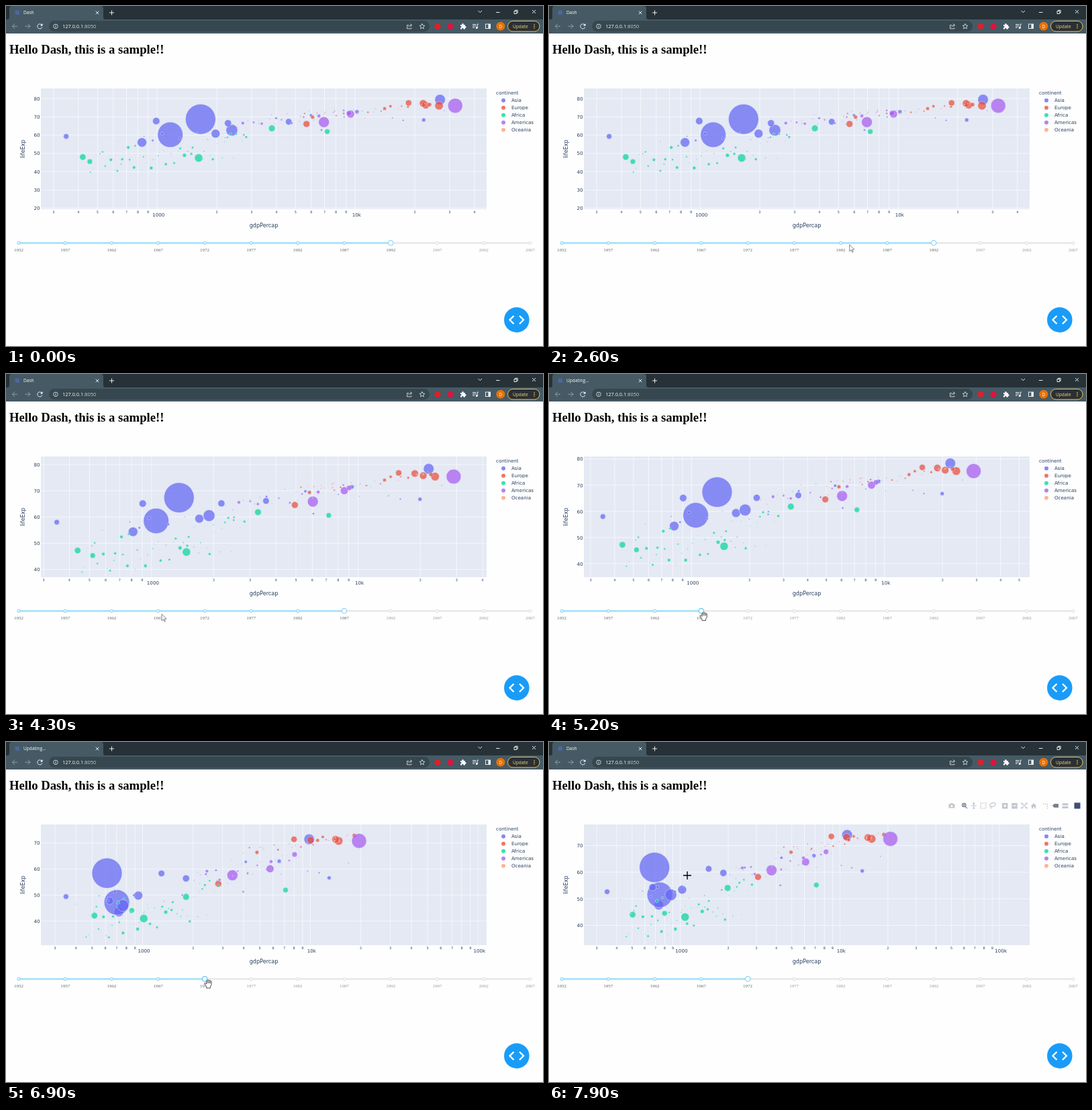
These frames come from a looping animation (800x507 px, 8000 ms). An HTML page:

```html
<!DOCTYPE html>
<html lang="en">
<head>
<meta charset="utf-8">
<title>Dash</title>
<style>
  html, body { margin: 0; width: 100%; height: 100%; overflow: hidden; background: #fefefe; }
  svg { display: block; width: 100%; height: 100%; }
  .ui { font-family: "Open Sans", sans-serif; fill: #fff; }
  .plot { font: 7.1px "DejaVu Sans", sans-serif; fill: #2a3f5f; }
  .line { fill: none; stroke: #e8ecee; stroke-width: 1; }
  .thin { stroke-width: .8; }
  .mid { text-anchor: middle; }
  .end { text-anchor: end; }
  .digit { font-size: 5px; }
  .axis { font-size: 8.1px; }
  .mark { font: 7px "Liberation Serif", serif; text-anchor: middle; }
</style>
</head>
<body>
<svg viewBox="0 0 800 507">
  <clipPath id="area"><rect x="52" y="123" width="664" height="180"/></clipPath>

  <!-- browser frame -->
  <g class="ui">
    <rect width="800" height="21" fill="#263238"/>
    <rect y="20" width="800" height="21" fill="#455a64"/>
    <path d="M2 20q3 0 3-3V4q0-4 4-4h132q4 0 4 4v13q0 3 3 3z" fill="#455a64"/>
    <rect x="13.5" y="6.5" width="6.5" height="6.5" fill="#4f6699"/>
    <text id="title" x="26" y="12.3" font-size="6.6"></text>
    <path class="line" d="M133.7 7.7l4.6 4.6m0-4.6l-4.6 4.6M154 10h7m-3.5-3.5v7"/>
    <path class="line" d="M703.5 7l2.7 2.7L709 7M730 9.5h5.5M784 6l5 5m0-5l-5 5M757 7.7h3.8v3.8H757zM758.3 7.5V6.3h3.9v3.9H761"/>
    <rect x="64" y="22" width="567" height="16.5" rx="8.2" fill="#37474f"/>
    <path class="line" stroke-opacity=".45" d="M17 30.2H9.5M13 26.6l-3.6 3.6 3.6 3.6M28.5 30.2H36M32.5 26.6l3.6 3.6-3.6 3.6"/>
    <path class="line" d="M53.3 28.3a3.6 3.6 0 1 0 .5 3.2"/>
    <path d="M54.5 26v3.5H51z"/>
    <circle class="line thin" cx="74" cy="30.3" r="3.3"/>
    <path class="line" d="M74 30v2.2M74 28.2v.9"/>
    <text x="84" y="33" font-size="7.4">127.0.0.1<tspan fill="#c3cdd2">:8050</tspan></text>
    <path class="line thin" d="M600 28.5h-2.5v5.3h6.5v-1.5M599.5 31.5q.5-2.7 4.3-2.9M602.3 26.7l2.5 1.9-2.5 2"/>
    <path class="line thin" d="M620 26.3l1.1 2.6 2.8.3-2.1 1.9.6 2.7-2.4-1.4-2.4 1.4.6-2.7-2.1-1.9 2.8-.3z"/>
    <circle cx="643" cy="30.2" r="4.6" fill="#d8222c"/>
    <circle cx="662" cy="30.2" r="4.6" fill="#dc1440"/>
    <path d="M677 28h2.3q-.5-2 1.2-2t1.2 2h2.3v2.2q1.7 0 1.7 1.3T684 32.8v1.7h-2.5q0-1.7-1.3-1.7t-1.2 1.7h-2v-2.4q1.5 0 1.5-1.2T677 29.9z"/>
    <path class="line" d="M695 27.5h5.5M695 29.8h5.5M695 32.1h3M702.3 32.5V27h1.7"/>
    <circle cx="701.2" cy="32.6" r="1.5"/>
    <rect class="line" x="714.5" y="27" width="7" height="6.5"/>
    <path d="M718.5 27h3v6.500h-3z"/>
    <circle cx="736.8" cy="30.2" r="6.5" fill="#e8710a"/>
    <text class="mid" x="736.8" y="32.6" font-size="6.5">D</text>
    <rect x="747.5" y="22.5" width="47.5" height="15.5" rx="7.7" fill="#2b3033" stroke="#e8c260"/>
    <text x="755" y="32.7" font-size="6.6" fill="#fbd777">Update</text>
    <path d="M787 27v6.6" stroke="#fbd777" stroke-width="1.3" stroke-dasharray="1.3"/>
  </g>

  <text x="5" y="71" style="font:bold 18.7px 'Liberation Serif',serif">Hello Dash, this is a sample!!</text>

  <g class="plot">
    <rect x="52" y="123" width="664" height="180" fill="#e4e9f4"/>
    <g id="grid"></g>
    <g id="dots" clip-path="url(#area)" stroke="#e5ecf6" stroke-width=".6"></g>
    <text class="axis mid" x="384" y="330">gdpPercap</text>
    <text class="axis mid" transform="translate(27.5 213)rotate(-90)">lifeExp</text>
    <text x="730" y="131.8">continent</text>
    <g id="legend"></g>
  </g>

  <!-- chart toolbar -->
  <g id="tools" fill="#c3c7cf" stroke="#c3c7cf" stroke-width="0">
    <path d="M595.5 92.5h2.2l.8-1.3h3l.8 1.3h2.2v6h-9z"/>
    <circle cx="600" cy="95.5" r="1.6" fill="#fefefe"/>
    <g fill="none" stroke-width="1.2">
      <path stroke="#747d8e" d="M621 94a2.7 2.7 0 1 0-5.4 0a2.7 2.7 0 1 0 5.4 0M620.3 96.3l2.7 2.7M616.8 94h3m-1.5-1.5v3"/>
      <path d="M628.5 95h8.5m-4.2-4.2v8.4M631.3 92l1.5-1.5 1.5 1.5M631.3 98l1.5 1.5 1.5-1.5"/>
      <path stroke-dasharray="1.5 .8" d="M643 91h8v8h-8z"/>
      <path d="M658 96.5q-2.2-1.5-.5-3.7t5-2.1 2.5 3-4.5 2.6-2.3.3q1 1.2-.5 2.9"/>
      <path d="M704 93v-2h2m4 0h2v2m0 4v2h-2m-4 0h-2v-2M705 92l6 6m0-6l-6 6"/>
      <path stroke-dasharray="2 1" d="M736 92.5h6.5v7"/>
    </g>
    <path d="M675 91h8.5v8.5H675zM689.3 91h8.5v8.5h-8.5zM717.5 95.5l4.5-4.3 4.5 4.3H725v3.7h-2v-2.5h-2v2.5h-2v-3.7zM764.5 91.5h9v3h-9zM764.5 96h9v3h-9z"/>
    <path fill="none" stroke="#fefefe" stroke-width="1.2" d="M677 95.2h4.5m-2.2-2.2v4.5M691.3 95.2h4.5"/>
    <path fill="#747d8e" d="M750 95l2.5-2.7h6.5v5.4h-6.5z"/>
    <rect x="782.5" y="90.5" width="9" height="9" fill="#3f4f75"/>
  </g>

  <g id="slider"></g>
  <circle cx="760.8" cy="468" r="18.8" fill="#199cf8"/>
  <path d="M756.5 462l-6 6 6 6M765 462l6 6-6 6" fill="none" stroke="#fff" stroke-width="2.3"/>
  <path id="cursor" stroke-linejoin="round"/>
</svg>

<script>
const $ = id => document.getElementById(id);
const mix = (a, b, p) => a + (b - a) * p;
const ease = p => p < .5 ? 4 * p ** 3 : 1 - 4 * (1 - p) ** 3;
const during = (spans, t) => spans.some(([a, b]) => t >= a && t < b);

let seed = 11;
const random = () => (seed = seed * 16807 % 2147483647) / 2147483647;

// large: radius, then gdp and life expectancy in 1967 and in 1992
// small: count, log gdp, its span, life, slope, noise, and the growth of both since 1967
const continents = [
  { name: 'Asia', color: '#6467f3', small: [23, 2.8, 1.65, 58, 9, 9, .2, 10], large: [
    [7, 721, 43.5, 838, 56], [22.5, 613, 58.4, 1656, 68.7], [18.9, 701, 47.2, 1164, 60.2], [6.5, 942, 49.8, 1972, 60.8],
    [8.7, 762, 46, 2383, 62.7], [5.4, 637, 47.8, 989, 67.7], [5.2, 1814, 56.4, 2279, 66.5], [4, 349, 49.4, 347, 59.3],
    [7.8, 9848, 71.4, 26825, 79.4], [4.8, 1295, 58.3, 4617, 67.3]] },
  { name: 'Europe', color: '#e94f3d', small: [24, 3.7, .7, 70, 10, 3, .12, 4], large: [
    [5, 2827, 54.3, 5678, 66.1], [6.3, 14746, 70.8, 26505, 76.1], [5.5, 14143, 71.4, 22705, 76.4],
    [5.4, 10022, 71.1, 22014, 77.4], [4.6, 7994, 71.4, 18604, 77.6]] },
  { name: 'Africa', color: '#0ad79b', small: [47, 2.65, .8, 44, 14, 14, 0, 6], large: [
    [6.1, 1015, 41, 1620, 47.5], [4.9, 1815, 49.3, 3794, 63.7], [4.7, 516, 42.1, 421, 48],
    [4, 862, 44.1, 457, 45.5], [4, 7114, 51.9, 7225, 61.9]] },
  { name: 'Americas', color: '#a85cf0', small: [21, 3.35, .6, 66, 10, 6, .06, 9], large: [
    [11, 19530, 70.8, 32004, 76.1], [8, 3430, 57.6, 6950, 67.1], [5.8, 5754, 60.1, 9472, 71.5],
    [3.9, 8053, 65.6, 9308, 71.9]] },
  { name: 'Oceania', color: '#ffa078', small: [2, 4.27, .1, 76.8, 5, 0, .15, 5.5], large: [] }
];

// axis: x of 1000, width of a decade, y of 70, height of one year of life
// gdp, life: progress from 1967 to 1992
const years = [
  { axis: [225.2, 295, 165.25, 2.725], gdp: 1, life: 1 },
  { axis: [216.9, 307.7, 174.1, 3.9125], gdp: .8, life: .87 },
  { axis: [203.7, 250, 150.5, 3.883], gdp: 0, life: 0 },
  { axis: [195.4, 237.9, 154.5, 3.967], gdp: .12, life: .33 }
];

// each country runs from [log gdp, life] in 1967 to the same in 1992
const countries = continents.flatMap(({ color, large, small }) => {
  const [count, gdp, span, life, slope, noise, gdpRise, lifeRise] = small;
  const main = large.map(([r, g0, l0, g1, l1]) =>
    ({ color, r, from: [Math.log10(g0), l0], to: [Math.log10(g1), l1] }));
  const others = Array.from({ length: count }, (_, i) => {
    const along = span * (i + random()) / count, rise = .8 + .4 * random();
    const to = [gdp + along, life + slope * along + noise * (random() - .5)];
    return { color, r: .7 + 2.4 * random() ** 2.5, from: [to[0] - gdpRise * rise, to[1] - lifeRise * rise], to };
  });
  return [...main, ...others];
});

// timeline in ms; a new year moves the axes first, then the bubbles
const axisStarts = [3430, 5000, 6830], dataStarts = [3880, 5450, 7310], moveTime = 450;
const updating = [[2850, 3650], [4600, 5250], [6600, 7050]];
const sliderSteps = [[0, 8], [2800, 7], [4500, 3], [5900, 4]];
const hands = [[2700, 3200], [4500, 7400]];
const path = [[1000, 20, 507], [1500, 54, 362], [1900, 54, 362], [2700, 504, 355], [3150, 504, 355], [4300, 232, 358],
  [5600, 228, 355], [6000, 299, 355], [7300, 300.5, 355.5], [7800, 206, 199], [8000, 206, 199]];

// which pair of years is being blended, and how far
function blend(starts, t) {
  const i = starts.filter(s => t >= s).length;
  const p = i ? ease(Math.min(1, (t - starts[i - 1]) / moveTime)) : 1;
  return [years[Math.max(0, i - 1)], years[i], p];
}

const label = (x, y, text, type = '') => `<text class="${type}" x="${x}" y="${y}">${text}</text>`;

function drawChart(t) {
  const [a, b, p] = blend(axisStarts, t);
  const [x0, decade, y70, unit] = a.axis.map((v, i) => mix(v, b.axis[i], p));
  let lines = '', text = '';
  for (let power = 2; power < 6; power++) for (let n = 1; n < 10; n++) {
    const x = x0 + (power - 3 + Math.log10(n)) * decade;
    if (x < 52 || x > 716) continue;
    lines += `M${x} 123v180`;
    text += n > 1 ? label(x, 308.7, n, 'digit mid')
      : label(x + 2, 314, power < 4 ? 10 ** power : 10 ** (power - 3) + 'k', 'mid');
  }
  for (let v = 20; v < 90; v += 10) {
    const y = y70 + (70 - v) * unit;
    if (y < 123 || y > 302.3) continue;
    lines += `M52 ${y}h664`;
    text += label(50.5, y + 2.7, v, 'end');
  }
  $('grid').innerHTML = `<path d="${lines}" stroke="#fff" stroke-width=".6"/>` + text;

  const [c, d, q] = blend(dataStarts, t), wealth = mix(c.gdp, d.gdp, q), health = mix(c.life, d.life, q);
  $('dots').innerHTML = countries.map(({ color, r, from, to }) => {
    const x = x0 + (mix(from[0], to[0], wealth) - 3) * decade;
    const y = y70 + (70 - mix(from[1], to[1], health)) * unit;
    return `<circle cx="${x}" cy="${y}" r="${r}" fill="${color}" opacity=".73"/>`;
  }).join('');
}

function drawSlider(t) {
  const value = sliderSteps.filter(s => t >= s[0]).pop()[1], at = i => 19 + i * 69.27;
  const rail = (end, color) => `<path d="M19 353.3H${end}" stroke="${color}" stroke-width="2.7"/>`;
  const ring = (i, r, color) => `<circle cx="${at(i)}" cy="353.3" r="${r}" fill="#fff" stroke="${color}" stroke-width="1.2"/>`;
  let out = rail(781, '#e9e9e9') + rail(at(value), '#abe2fb');
  for (let i = 0; i < 12; i++) {
    out += ring(i, 2, i > value ? '#e3e3e3' : '#8fd8f8');
    out += `<text class="mark" x="${at(i)}" y="366" fill="${i > value ? '#999' : '#666'}">${1952 + i * 5}</text>`;
  }
  $('slider').innerHTML = out + ring(value, 3.7, during(hands, t) ? '#57c5f7' : '#8ad4f5');
}

const shapes = {
  arrow: ['M0 0v10l2.4-2.2 1.7 3.6 1.4-.7-1.7-3.5h3.3z', '#fff', '#666', .8],
  hand: ['M-4.5 4.5q1-1 2 0l1 1V1q.9-1.3 1.8 0V0q1-1.3 2 0v.6q1-1.2 2 0v1q1-.9 1.7.2v4.7l-1.7 3.2v2h-5.5V10zM.3 1v3.5M2.3.6v3.9M4.3 1.6v3', '#fff', '#222', .8],
  cross: ['M-6 0H6M0-6V6', 'none', '#000', 1.4]
};

function drawCursor(t) {
  const cursor = $('cursor'), i = path.findIndex(k => k[0] > t);
  cursor.style.display = i > 0 ? '' : 'none';
  if (i < 1) return;
  const [t0, ax, ay] = path[i - 1], [t1, bx, by] = path[i], p = (t - t0) / (t1 - t0);
  const x = mix(ax, bx, p), y = mix(ay, by, p);
  const [d, fill, stroke, width] = shapes[y < 303 ? 'cross' : during(hands, t) ? 'hand' : 'arrow'];
  const look = { d, fill, stroke, 'stroke-width': width, transform: `translate(${x} ${y})` };
  for (const name in look) cursor.setAttribute(name, look[name]);
}

$('legend').innerHTML = continents.map(({ name, color }, i) =>
  `<circle cx="741" cy="${140.7 + i * 11}" r="3" fill="${color}" opacity=".78"/>` + label(753, 143.3 + i * 11, name)).join('');

let shown = -1;
function frame() {
  const t = Math.floor(performance.now() % 8000 / 100) * 100;
  if (t !== shown) {
    shown = t;
    drawChart(t);
    drawSlider(t);
    drawCursor(t);
    $('title').textContent = during(updating, t) ? 'Updating...' : 'Dash';
    $('tools').style.opacity = Math.max(0, Math.min(1, (t - 7500) / 300));
  }
  requestAnimationFrame(frame);
}
frame();
</script>
</body>
</html>
```
